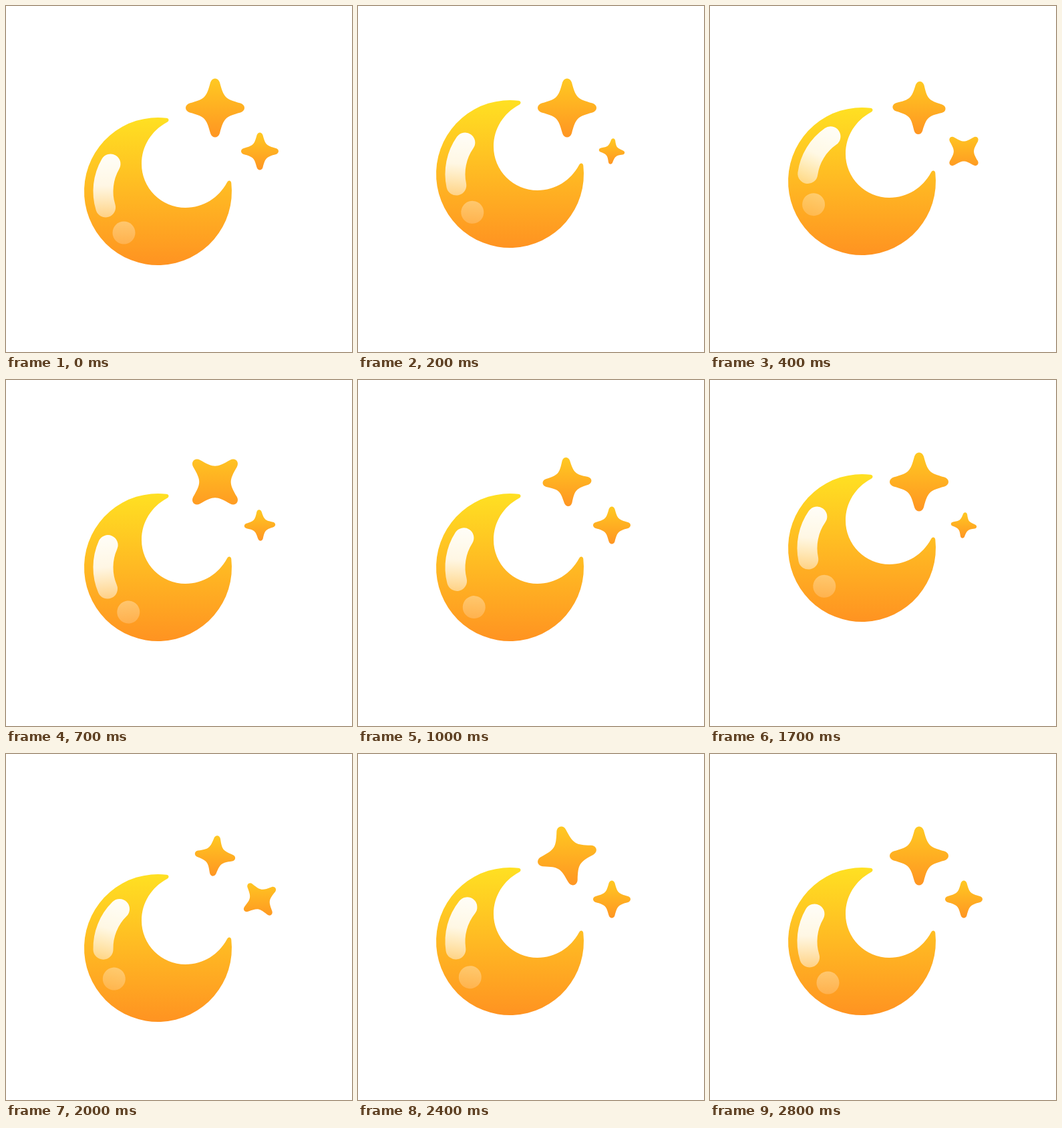
These frames come from a looping animation (518 by 518 pixels, 3000 ms). An HTML page with a canvas:

```html
<!DOCTYPE html>
<html lang="en">
<head>
<meta charset="utf-8">
<title>Moon and stars</title>
<style>
  html, body { margin: 0; width: 100%; height: 100%; overflow: hidden; background: #fff; }
  canvas { display: block; width: 518px; height: 518px; }
</style>
</head>
<body>
<canvas id="stage" width="518" height="518"></canvas>
<script>
const ctx = document.getElementById('stage').getContext('2d');
const LOOP = 3000, STEP = 100, LAST_STEP = 28, CYCLE = 15;
const rad = deg => deg * Math.PI / 180;

// One pose per step; anything past the end is at rest.
const lift = [-3, -15, -29, -31, -18, 10, 2];
const swing = [0, 0, 5, 17, 25, 15.5, 0, -6, 3, 8.6, 2.6, -4, -2];
const turn = [0, 2, 7, 25, 45, 54, 77, 87];
const size = [1, .9, .69, .85, 1.03, 1.03, 1.02, .83, .93];

// Moon outline around the centre of its outer circle.
const moon = new Path2D(
  'M13.5 -103.5C-9.5 -91 -24.5 -68 -24.5 -41A65.5 65.5 0 0 0 41 24.5' +
  'C68 24.5 91 9.5 103.5 -13.5C105.5 -17.5 109.5 -16.5 109.8 -12.5' +
  'A110.5 110.5 0 1 1 12.5 -109.8C16.5 -109.5 17.5 -105.5 13.5 -103.5Z');

function gradient(top, bottom, ...colors) {
  const g = ctx.createLinearGradient(0, top, 0, bottom);
  colors.forEach((c, i) => g.addColorStop(i / (colors.length - 1), c));
  return g;
}

function drawMoon(step) {
  ctx.save();
  ctx.translate(227.5, 280.5 + (lift[step] ?? 0));
  ctx.fillStyle = gradient(-110, 110, '#ffe022', '#ffb923', '#ff9321');
  ctx.fill(moon);

  ctx.rotate(rad(swing[step] ?? 0));
  ctx.lineCap = 'round';
  ctx.lineWidth = 30;
  ctx.strokeStyle = gradient(-56, 39, 'rgba(255,255,255,.97)', 'rgba(255,255,255,.88)', 'rgba(255,255,255,.45)');
  ctx.beginPath();
  ctx.arc(0, 0, 82, rad(163), rad(210));
  ctx.stroke();

  ctx.fillStyle = gradient(45, 79, 'rgba(255,255,255,.34)', 'rgba(255,255,255,.2)');
  ctx.beginPath();
  ctx.arc(-51, 62, 17, 0, 7);
  ctx.fill();
  ctx.restore();
}

function drawStar(x, y, radius, step) {
  const r = radius * (size[step] ?? 1), k = r / 44;
  ctx.save();
  ctx.translate(x, y);
  ctx.save();
  ctx.rotate(rad(turn[step] ?? 0));
  ctx.scale(k, k);
  ctx.beginPath();
  ctx.moveTo(7, -38);
  for (let i = 0; i < 4; i++) {
    ctx.bezierCurveTo(13, -15.5, 15.5, -13, 38, -7);
    ctx.bezierCurveTo(46, -4.5, 46, 4.5, 38, 7);
    ctx.rotate(Math.PI / 2);
  }
  ctx.closePath();
  ctx.restore();
  // Filled upright so the shading does not turn with the star.
  ctx.fillStyle = gradient(-r, r, '#ffc922', '#ff9522');
  ctx.fill();
  ctx.restore();
}

function draw() {
  const step = Math.min(LAST_STEP, Math.floor(performance.now() % LOOP / STEP)) % CYCLE;
  ctx.fillStyle = '#fff';
  ctx.fillRect(0, 0, 518, 518);
  drawMoon(step);
  drawStar(313, 152.5, 44, (step + CYCLE - 3) % CYCLE);
  drawStar(380, 217.5, 28, step);
  requestAnimationFrame(draw);
}
draw();
</script>
</body>
</html>
```
